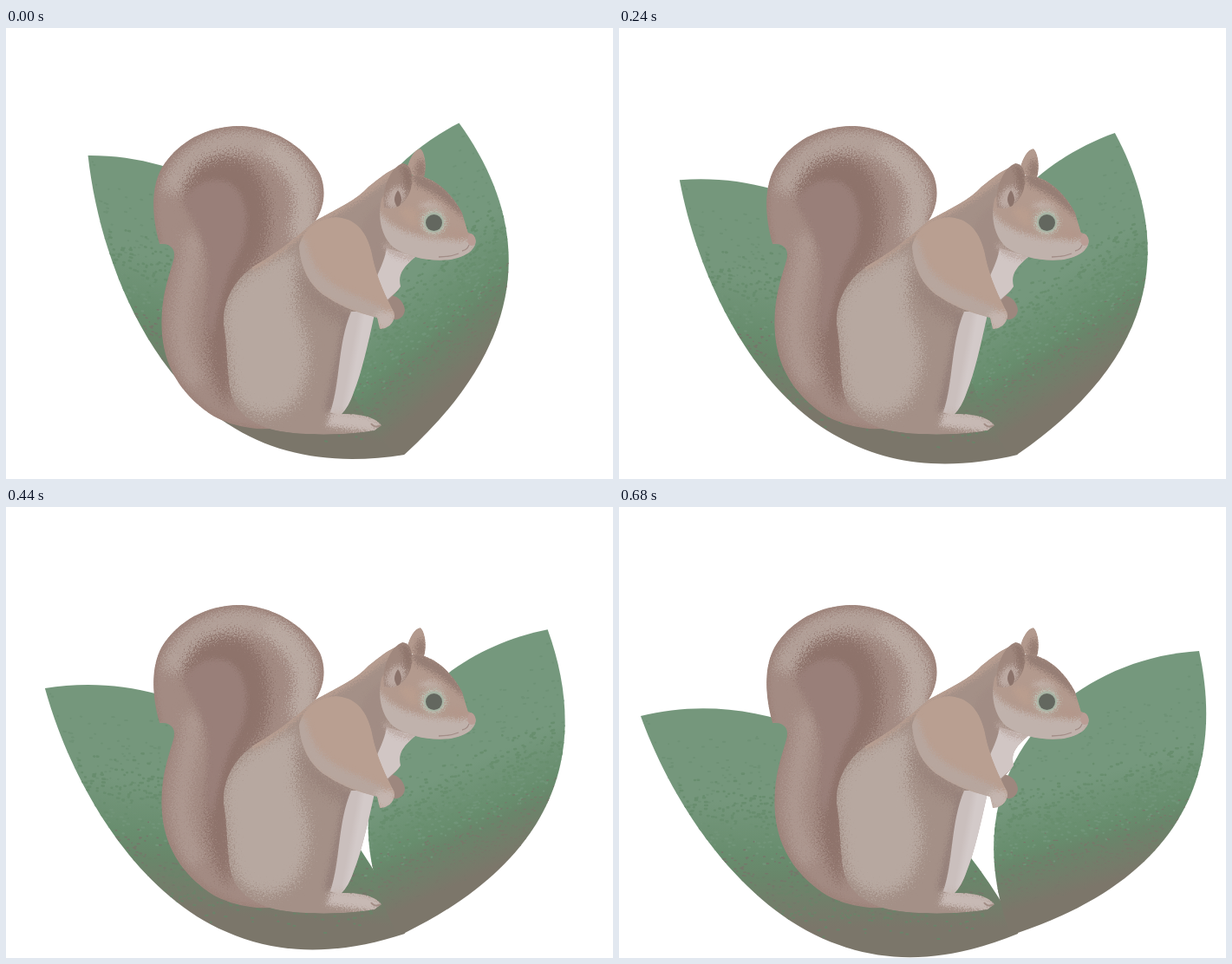
These frames come from a looping animation (700x520 px, 1920 ms). An HTML page:

```html
<!DOCTYPE html>
<html lang="en">
<head>
<meta charset="utf-8">
<title>Squirrel in leaves</title>
<style>
  html, body { margin: 0; width: 100%; height: 100%; overflow: hidden; background: #fff; }
  svg { display: block; width: 100%; height: 100%; }
  .soft { filter: url(#soft); }
  .fine { filter: url(#fine); }
  .specks path { fill: none; stroke-linecap: round; }
</style>
</head>
<body>
<svg viewBox="0 0 700 520">
  <defs>
    <filter id="soft" filterUnits="userSpaceOnUse" x="0" y="0" width="700" height="520" color-interpolation-filters="sRGB">
      <feGaussianBlur in="SourceGraphic" stdDeviation="5" result="b"/>
      <feTurbulence type="fractalNoise" baseFrequency=".6" numOctaves="2" seed="4" result="n"/>
      <feDisplacementMap in="b" in2="n" scale="38" xChannelSelector="R" yChannelSelector="G"/>
    </filter>
    <filter id="fine" filterUnits="userSpaceOnUse" x="0" y="0" width="700" height="520" color-interpolation-filters="sRGB">
      <feGaussianBlur in="SourceGraphic" stdDeviation="2.5" result="b"/>
      <feTurbulence type="fractalNoise" baseFrequency=".7" numOctaves="2" seed="9" result="n"/>
      <feDisplacementMap in="b" in2="n" scale="14" xChannelSelector="R" yChannelSelector="G"/>
    </filter>

    <linearGradient id="leftTone" gradientUnits="userSpaceOnUse" x1="200" y1="310" x2="200" y2="500">
      <stop offset=".15" stop-color="#75977c"/>
      <stop offset=".47" stop-color="#688d6e"/>
      <stop offset=".62" stop-color="#69866a"/>
      <stop offset=".92" stop-color="#7b766a"/>
    </linearGradient>
    <linearGradient id="rightTone" gradientUnits="userSpaceOnUse" x1="500" y1="290" x2="549.5" y2="455">
      <stop offset=".2" stop-color="#75987d"/>
      <stop offset=".52" stop-color="#678d6d"/>
      <stop offset=".62" stop-color="#69856a"/>
      <stop offset=".9" stop-color="#7c766a"/>
    </linearGradient>
    <linearGradient id="bellyTone" gradientUnits="userSpaceOnUse" x1="383" y1="390" x2="416" y2="396">
      <stop offset=".35" stop-color="#cabfbd"/>
      <stop offset=".6" stop-color="#d3cac9"/>
    </linearGradient>

    <path id="leftLeaf" d="M25 241C175 204 350 285 460 488L460 492C390 521 320 529 254 505C146 468 63 347 25 241Z"/>
    <path id="rightLeaf" d="M669 166C698 300 655 425 460 491L450 489C382 300 520 175 669 166Z"/>
    <path id="tail" d="M177 249C167 214 167 178 183 156C205 125 240 112 272 113C316 116 347 141 362 168C370 187 367 207 357 222L340 330L320 461C293 465 263 460 240 448C207 427 184 397 180 354C177 316 186 292 193 268C196 257 192 248 177 249Z"/>
    <path id="body" d="M251 343C249 312 266 286 290 272C319 255 336 240 357 222C384 207 405 198 418 183C428 175 440 165 454 159L472 264C456 277 452 286 455 298C448 309 436 318 425 330C417 366 410 398 401 420C397 432 392 440 387 445C404 445 423 446 433 458L425 464C393 470 344 470 316 465C289 460 265 446 259 420C254 394 256 371 251 343Z"/>
    <path id="arm" d="M338 252C342 233 358 220 380 218C405 219 418 237 423 265C428 289 439 311 448 329C449 340 440 347 431 347L428 334C403 328 382 319 365 307C350 295 340 278 338 252Z"/>
    <path id="head" d="M433 197C442 181 456 169 473 170C494 172 513 189 526 213L533 236C540 237 543 243 541 250C537 260 526 264 513 267C489 270 463 264 447 253C433 241 428 218 433 197Z"/>
    <path id="ear" d="M436 207C432 187 443 161 457 156C466 156 471 169 467 185C463 200 451 212 436 207Z"/>
    <path id="backEar" d="M462 163C465 150 471 140 478 139C484 144 486 163 481 175L465 168Z"/>

    <clipPath id="inLeft"><use href="#leftLeaf"/></clipPath>
    <clipPath id="inRight"><use href="#rightLeaf"/></clipPath>
    <clipPath id="inTail"><use href="#tail"/></clipPath>
    <clipPath id="inBody"><use href="#body"/></clipPath>
    <clipPath id="inArm"><use href="#arm"/></clipPath>
    <clipPath id="inHead"><use href="#head"/></clipPath>
    <clipPath id="inEar"><use href="#ear"/></clipPath>
    <clipPath id="inBackEar"><use href="#backEar"/></clipPath>
  </defs>

  <g id="left">
    <use href="#leftLeaf" fill="url(#leftTone)"/>
    <g class="specks" clip-path="url(#inLeft)"></g>
  </g>
  <g id="right">
    <use href="#rightLeaf" fill="url(#rightTone)"/>
    <g class="specks" clip-path="url(#inRight)"></g>
  </g>

  <g clip-path="url(#inTail)">
    <use href="#tail" fill="#a38b83"/>
    <path class="soft" fill="none" stroke="#b3a199" stroke-width="26" d="M190 190C215 126 286 116 322 150C352 178 350 210 338 250"/>
    <path class="soft" fill="none" stroke="#baaaa2" stroke-width="22" d="M300 136C345 162 352 200 338 240"/>
    <path class="soft" fill="none" stroke="#ad9890" stroke-width="20" d="M214 238C218 270 203 300 202 345C203 370 210 390 220 410"/>
    <path class="soft" fill="#8e736b" d="M204 192C210 158 240 142 268 150C303 164 312 213 298 260C272 286 262 320 258 440C235 410 226 370 236 320C244 283 245 240 204 192Z"/>
    <path class="fine" fill="#997f79" d="M205 200C214 177 238 171 257 178C283 194 282 237 266 265C252 290 246 318 238 354C224 340 236 303 233 271C231 245 216 225 205 200Z"/>
    <path class="fine" fill="none" stroke="#9b8077" stroke-width="5" d="M177 249C167 214 167 178 183 156C205 125 240 112 272 113C316 116 347 141 362 168C370 187 367 207 357 222"/>
    <path class="fine" fill="none" stroke="#9b8077" stroke-width="5" d="M193 260C177 310 172 354 191 394C209 430 245 460 300 463"/>
  </g>

  <path fill="#9d877e" d="M440 309C451 306 460 317 460 326C458 335 451 338 443 335Z"/>

  <g clip-path="url(#inBody)">
    <use href="#body" fill="#a49087"/>
    <path class="soft" fill="#b7a8a0" d="M251 338C254 300 282 273 333 258C342 288 324 314 343 344C356 385 346 421 326 438C299 456 270 442 261 415Z"/>
    <path class="fine" fill="none" stroke="#b79d90" stroke-width="11" d="M282 276C322 254 334 233 370 215C400 199 421 184 447 163"/>
    <path class="soft" fill="#98827a" d="M333 272C350 299 376 318 397 325L390 342C364 329 343 313 333 272Z"/>
    <path class="fine" fill="#a18c84" d="M433 202C416 214 407 226 410 242C419 258 425 276 429 292L440 258Z"/>
    <path fill="#d1c6c4" d="M439 254C436 270 430 280 428 286L438 315L458 297L474 264Z"/>
    <path class="fine" fill="none" stroke="#b9a69f" stroke-width="6" d="M437 250C448 262 460 264 474 264"/>
    <path class="fine" fill="#95807a" d="M389 329C386 363 375 405 367 441L377 443L397 329Z"/>
    <path fill="url(#bellyTone)" d="M398 327L428 327C420 372 412 402 402 425C397 437 391 442 386 446L374 443C386 408 382 365 398 327Z"/>
    <path class="fine" fill="#c7b9b4" d="M376 441C398 444 425 444 435 458L423 466C404 464 386 460 369 459Z"/>
    <path fill="none" stroke="#a28d85" stroke-width="2" d="M421 456Q425 462 434 458"/>
  </g>

  <g clip-path="url(#inArm)">
    <use href="#arm" fill="#b99f91"/>
    <path class="fine" fill="none" stroke="#b7a69e" stroke-width="18" d="M337 244C342 283 365 301 389 312L433 332"/>
    <path class="fine" fill="#c4b5af" d="M426 328L446 326L450 345L430 349Z"/>
  </g>

  <g clip-path="url(#inBackEar)">
    <use href="#backEar" fill="#b39a8e"/>
    <path class="fine" fill="#967d73" d="M472 171C470 160 475 150 482 151L486 174Z"/>
  </g>

  <g clip-path="url(#inHead)">
    <use href="#head" fill="#b39a8e"/>
    <path class="fine" fill="#c0b2ac" d="M426 205C439 230 463 236 479 240C495 245 515 244 543 243L535 276L469 276L429 251Z"/>
    <path class="fine" fill="#957d74" d="M464 165C492 171 521 188 532 222C515 211 503 192 474 182Z"/>
    <path class="fine" fill="#b99d8e" d="M453 211Q463 203 475 211L474 230Q461 227 453 211Z"/>
    <path class="fine" fill="#c2b3ac" d="M474 207Q491 192 508 212L497 207Z"/>
    <path class="fine" fill="#b3978b" d="M506 235Q518 228 535 239L521 245Z"/>
    <ellipse cx="537" cy="244" rx="5" ry="7" fill="#b99d95"/>
    <path fill="none" stroke="#a28d87" stroke-width="1.3" d="M534 250Q532 256 526 257M499 264Q512 264 522 260"/>
  </g>
  <circle class="fine" cx="493" cy="224" r="13.500" fill="#bdc3b6"/>
  <circle cx="493.500" cy="224" r="11.500" fill="#a9b5a5"/>
  <circle cx="493.500" cy="224.500" r="9.500" fill="#63675f"/>

  <g clip-path="url(#inEar)">
    <use href="#ear" fill="#a0887e"/>
    <path class="fine" fill="#8d746b" d="M455 159C469 156 473 181 462 195L460 178Z"/>
    <path class="fine" fill="#bcaaa3" d="M438 205C438 190 446 181 456 183C466 190 456 207 444 209Z"/>
    <path fill="#8b736b" d="M452 187Q460 198 452 207Q444 198 452 187Z"/>
  </g>
</svg>
<script>
  const NS = "http://www.w3.org/2000/svg";
  const LOOP = 1920, STEP = 40, SWING = 680;
  const left = document.getElementById("left");
  const right = document.getElementById("right");

  let seed = 17;
  const rand = () => (seed = (seed * 16807) % 2147483647) / 2147483647;
  const around = (mid, spread) => mid + (rand() + rand() + rand() - 1.5) * spread;

  // Scatter round specks along a band that rises to the right by `slope`.
  function specks(leaf, x0, x1, slope, mid, spread, count, size, color) {
    let d = "";
    for (let i = 0; i < count; i++) {
      const x = x0 + rand() * (x1 - x0);
      const y = around(mid, spread) - slope * x;
      d += `M${x.toFixed(1)} ${y.toFixed(1)}h${(rand() * 2.5 + .1).toFixed(1)}`;
    }
    const path = document.createElementNS(NS, "path");
    path.setAttribute("d", d);
    path.setAttribute("stroke", color);
    path.setAttribute("stroke-width", size);
    leaf.querySelector(".specks").append(path);
  }

  specks(left, 30, 420, 0, 318, 70, 260, 2, "#6e9175");
  specks(left, 30, 420, 0, 352, 36, 420, 2.6, "#688d6e");
  specks(left, 60, 420, 0, 385, 32, 190, 2.2, "#719478");
  specks(left, 100, 420, 0, 430, 38, 380, 1.6, "#75776a");
  specks(left, 120, 420, 0, 458, 34, 260, 2, "#6a8369");
  specks(right, 430, 680, .3, 462, 70, 200, 2, "#6e9276");
  specks(right, 430, 680, .3, 500, 32, 360, 2.6, "#688e6e");
  specks(right, 430, 680, .3, 522, 26, 150, 2.2, "#709478");
  specks(right, 430, 680, .3, 564, 34, 420, 1.2, "#78776a");

  const turn = (leaf, angle) => leaf.setAttribute("transform", `rotate(${angle} 460 490)`);

  function draw(now) {
    const t = Math.floor((now % LOOP) / STEP) * STEP;
    const u = Math.min(t / SWING, 1);
    const rest = 1 - (u - .04 * Math.sin(2 * Math.PI * u));
    turn(left, 13.4 * rest);
    turn(right, -23.5 * rest);
  }

  const start = performance.now();
  function tick() {
    draw(performance.now() - start);
    requestAnimationFrame(tick);
  }
  tick();
</script>
</body>
</html>
```
